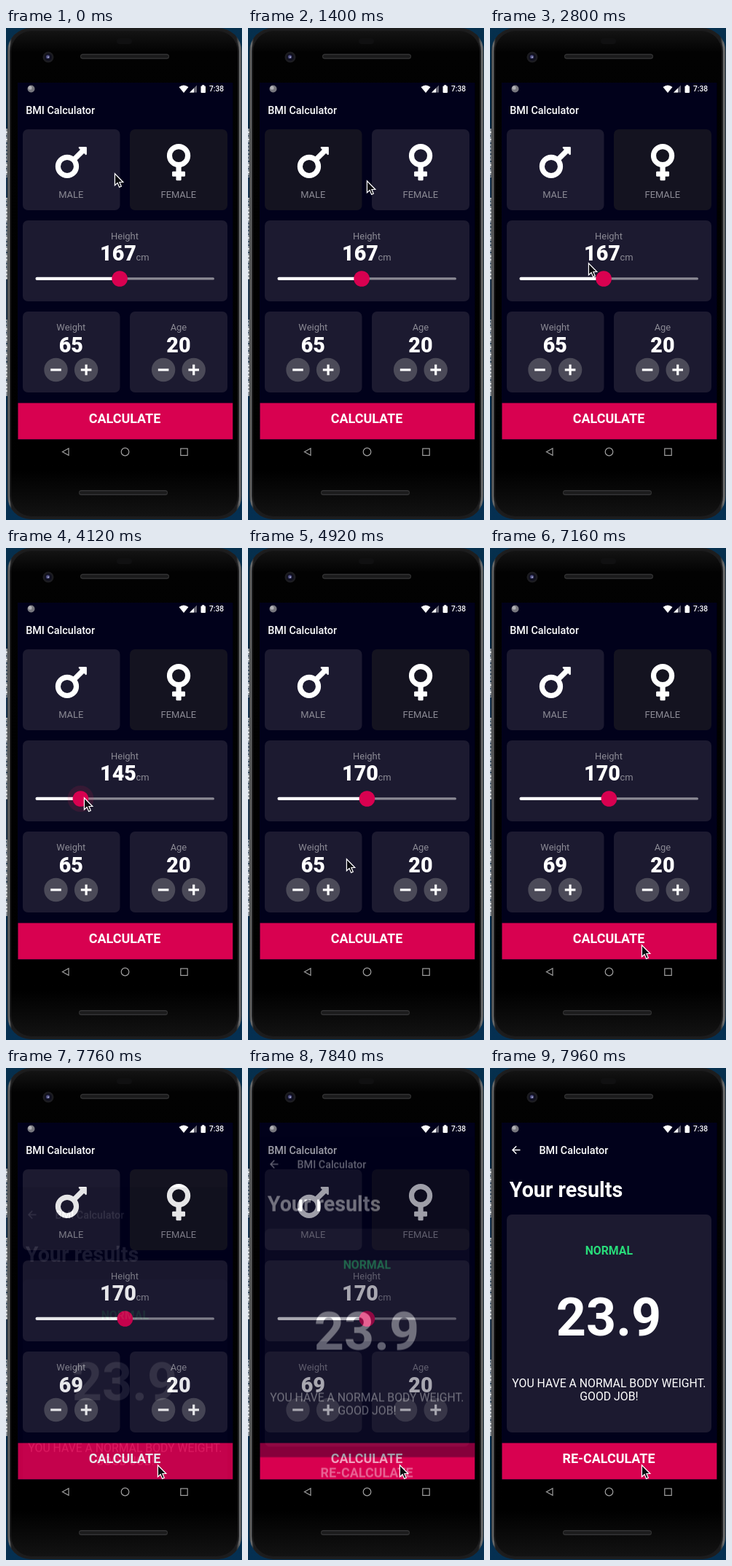
These frames come from a looping animation (324x675 px, 8 s). An HTML page with a canvas:

```html
<!DOCTYPE html>
<html lang="en">
<head>
<meta charset="utf-8">
<title>BMI Calculator</title>
<style>
html, body { margin: 0; width: 100%; height: 100%; overflow: hidden; background: #06304e; }
canvas { display: block; width: 324px; height: 675px; }
</style>
</head>
<body>
<canvas id="stage"></canvas>
<script>
const W = 324, H = 675, LOOP = 8000, STEP = 40;
const canvas = document.getElementById('stage');
const dpr = window.devicePixelRatio || 1;
canvas.width = W * dpr;
canvas.height = H * dpr;
const c = canvas.getContext('2d');

const NAVY = '#01011b', CARD = '#1c1a30', DIM = '#141320', PINK = '#d80150';
const GREY = '#8b8a94', WHITE = '#fff', ROUND = '#4b4a58';

// time, x, y of the pointer tip
const POINTER = [
  [560, 149, 199], [600, 190, 208], [640, 190, 208], [680, 231, 216],
  [1360, 231, 216], [1400, 163, 209], [1680, 163, 209], [1720, 86, 198],
  [2560, 86, 198], [2800, 135, 322], [3200, 158, 348], [3480, 158, 348],
  [3840, 109, 345], [3960, 109, 345], [4040, 105, 342], [4120, 107, 342],
  [4440, 167, 342], [4560, 167, 342], [4600, 168, 344], [4920, 135, 426],
  [5120, 125, 454], [5280, 125, 454], [5320, 120, 461], [5360, 120, 461],
  [5400, 115, 468], [6600, 115, 468], [6840, 206, 530], [7000, 206, 530],
  [7160, 208, 544]
];
const HEIGHT = [
  [3480, 167], [3840, 146], [3960, 146], [4040, 144], [4120, 145],
  [4440, 169], [4560, 169], [4600, 170]
];
const TAPS = [5760, 5960, 6160, 6360];
const PAGE_START = 7688, PAGE_TIME = 272;

const clamp = v => Math.max(0, Math.min(1, v));

function at(keys, t, col) {
  if (t <= keys[0][0]) return keys[0][col];
  for (let i = 1; i < keys.length; i++) {
    const a = keys[i - 1], b = keys[i];
    if (t <= b[0]) return a[col] + (b[col] - a[col]) * (t - a[0]) / (b[0] - a[0]);
  }
  return keys[keys.length - 1][col];
}

function bezier(x1, y1, x2, y2) {
  const f = (a, b, s) => 3 * a * s * (1 - s) ** 2 + 3 * b * s * s * (1 - s) + s ** 3;
  return x => {
    let lo = 0, hi = 1;
    for (let i = 0; i < 24; i++) {
      const m = (lo + hi) / 2;
      if (f(x1, x2, m) < x) lo = m; else hi = m;
    }
    return f(y1, y2, hi);
  };
}
const slowIn = bezier(.4, 0, .2, 1), easeIn = bezier(.42, 0, 1, 1);

function box(x, y, w, h, r, fill) {
  c.beginPath();
  c.roundRect(x, y, w, h, r);
  c.fillStyle = fill;
  c.fill();
}

function disc(x, y, r, fill) {
  c.beginPath();
  c.arc(x, y, r, 0, Math.PI * 2);
  c.fillStyle = fill;
  c.fill();
}

function poly(pts, fill) {
  c.beginPath();
  pts.forEach(([x, y]) => c.lineTo(x, y));
  c.closePath();
  if (fill) {
    c.fillStyle = fill;
    c.fill();
  }
}

function line(x1, y1, x2, y2, width, color) {
  c.beginPath();
  c.moveTo(x1, y1);
  c.lineTo(x2, y2);
  c.lineWidth = width;
  c.strokeStyle = color;
  c.stroke();
}

function text(s, x, y, size, weight, color = WHITE, align = 'center') {
  c.font = `${weight} ${size}px Roboto, sans-serif`;
  c.textAlign = align;
  c.fillStyle = color;
  c.fillText(s, x, y);
}

function gradient(x, y, stops) {
  const g = c.createLinearGradient(0, 0, x, y);
  stops.forEach(([p, color]) => g.addColorStop(p, color));
  return g;
}

function desktop() {
  box(0, 0, W, H, 0, gradient(0, H, [[0, '#06304e'], [.3, '#04233c'], [1, '#053052']]));
  box(0, 138, 4, 367, 0, '#8d949b');
  for (let y = 142; y < 500; y += 5) {
    const n = Math.abs(Math.sin(y * 12.9) * 43.7) % 1;
    box(0, y, 1 + n * 2, 2, 0, n > .5 ? '#d5d8da' : '#33485c');
  }
  box(0, 205, 3, 28, 0, '#183450');
  box(0, 345, 3, 55, 0, '#21384f');
}

function phone() {
  box(2, 0, 321.5, 674, 32, gradient(W, 0, [
    [.006, '#2c2d2e'], [.014, '#727475'], [.024, '#1d1d1e'],
    [.976, '#1d1d1e'], [.99, '#727475'], [1, '#3a3b3c']
  ]));
  box(5, 2, 315, 670, 30, '#1c1c1d');
  box(7, 4, 311, 666, 28, gradient(0, H, [
    [0, '#161616'], [.05, '#020202'], [.9, '#000'], [1, '#141414']
  ]));
  box(152, 14, 21, 8, 4, '#101011');
  for (const [x, y] of [[102, 35.5], [100, 634]]) {
    box(x, y, 122, 7, 3.5, '#333334');
    box(x + 1, y + 1.5, 120, 4, 2, '#1b1b1c');
  }
  disc(58, 40, 7.5, '#1c1c20');
  disc(58, 40, 5, '#10101f');
  disc(57.5, 39.5, 2.6, '#4a4a7c');
  disc(58, 40, 1.1, '#a9abc8');
  box(16, 75, 295.5, 525, 0, '#000');
}

function statusBar() {
  disc(34.5, 83.5, 5, '#77777e');
  disc(33, 82, 2.6, '#b0b0b5');
  c.beginPath();
  c.moveTo(244, 89);
  c.lineTo(237.5, 81);
  c.quadraticCurveTo(244, 76, 250.5, 81);
  c.closePath();
  c.fillStyle = WHITE;
  c.fill();
  poly([[252, 88.5], [262, 78.5], [262, 88.5]], '#686876');
  poly([[252, 88.5], [258, 82.5], [258, 88.5]], WHITE);
  box(267.5, 79.5, 6.5, 9.5, 1, WHITE);
  box(269.2, 78.2, 3, 2, 0, WHITE);
  text('7:38', 289, 87.3, 10.2, 500);
}

function navBar() {
  c.strokeStyle = '#a0a0a0';
  c.lineWidth = 1.2;
  poly([[77.5, 581.5], [86, 576.8], [86, 586.2]]);
  c.stroke();
  c.beginPath();
  c.arc(163.5, 581.5, 5.3, 0, Math.PI * 2);
  c.stroke();
  c.strokeRect(239.8, 577, 9.4, 9.4);
}

// gender signs are drawn on a 512 unit grid
function sign(x, y, draw) {
  c.save();
  c.translate(x, y);
  c.scale(.1122, .1122);
  c.strokeStyle = WHITE;
  c.lineWidth = 64;
  c.lineJoin = 'round';
  draw();
  c.restore();
}

function ring(x, y) {
  c.beginPath();
  c.arc(x, y, 112, 0, Math.PI * 2);
  c.stroke();
}

function male() {
  ring(144, 304);
  line(232, 216, 336, 112, 64, WHITE);
  poly([[294, 74], [374, 74], [374, 154]], WHITE);
  c.lineWidth = 20;
  c.stroke();
}

function female() {
  ring(144, 176);
  box(112, 300, 64, 180, 12, WHITE);
  box(64, 368, 160, 64, 12, WHITE);
}

function roundButton(x, plus) {
  disc(x, 469, 16.2, ROUND);
  box(x - 7.3, 467.4, 14.6, 3.2, 0, WHITE);
  if (plus) box(x - 1.6, 461.7, 3.2, 14.6, 0, WHITE);
}

function ripple(t) {
  for (const tap of TAPS) {
    const p = (t - tap) / 200;
    if (p < 0 || p >= 1) continue;
    c.save();
    c.globalAlpha = .22 * (1 - p);
    disc(110, 469, 8 + 8 * clamp(p * 2), WHITE);
    c.restore();
  }
}

function slider(t) {
  const value = Math.round(at(HEIGHT, t, 1));
  const x = 41.4 + (value - 120) * 2.44;
  text('Height', 163, 289.5, 12.93, 400, GREY);
  text(value, 129, 319, 28.7, 900, WHITE, 'left');
  text('cm', 178.6, 319, 12.93, 400, GREY, 'left');
  box(x, 342.2, 286 - x, 3.4, 1.7, GREY);
  box(40.5, 341.8, x - 40, 4.2, 2, WHITE);
  const halo = clamp((t - 3480) / 120) * clamp((4680 - t) / 120);
  if (halo > 0) disc(x, 344, 18 * halo, 'rgba(235,21,85,.12)');
  disc(x, 344, 10.8, PINK);
}

function counter(x, label, value) {
  text(label, x, 415, 12.93, 400, GREY);
  text(value, x, 445, 28.7, 900);
  roundButton(x - 20.8, false);
  roundButton(x + 20.8, true);
}

function bottomButton(label) {
  box(16.5, 514.5, 294.8, 49.7, 0, PINK);
  text(label, 163, 541.8, 17.95, 700);
}

function inputPage(t) {
  const isFemale = t >= 1160 && t < 2160;
  box(16, 75, 295.5, 490, 0, NAVY);
  text('BMI Calculator', 27.2, 117.5, 14.36, 500, WHITE, 'left');
  box(23, 139, 133.5, 111, 7, isFemale ? DIM : CARD);
  box(170, 139, 134, 111, 7, isFemale ? CARD : DIM);
  sign(67.8, 155.8, male);
  sign(220.9, 155.4, female);
  text('MALE', 89.2, 233.3, 12.93, 400, GREY);
  text('FEMALE', 236.8, 233.3, 12.93, 400, GREY);
  box(23, 264, 281, 111, 7, CARD);
  slider(t);
  box(23, 389, 133.5, 111, 7, CARD);
  box(170, 389, 134, 111, 7, CARD);
  counter(89.3, 'Weight', 65 + TAPS.filter(tap => t >= tap + 80).length);
  ripple(t);
  counter(236.9, 'Age', 20);
  bottomButton('CALCULATE');
}

function resultPage() {
  box(16, 75, 295.5, 490, 0, NAVY);
  line(31, 112.5, 41.5, 112.5, 1.5, WHITE);
  c.beginPath();
  c.moveTo(36.2, 107.2);
  c.lineTo(31, 112.5);
  c.lineTo(36.2, 117.8);
  c.stroke();
  text('BMI Calculator', 67.5, 117.5, 14.36, 500, WHITE, 'left');
  text('Your results', 26.8, 176.8, 28.7, 700, WHITE, 'left');
  box(23, 201, 281, 299, 7, CARD);
  text('NORMAL', 163.3, 255.8, 15.8, 700, '#28dc7a');
  text('23.9', 163, 367, 71.8, 700);
  text('YOU HAVE A NORMAL BODY WEIGHT.', 163.4, 437.5, 15.8, 400);
  text('GOOD JOB!', 163.4, 456, 15.8, 400);
  bottomButton('RE-CALCULATE');
}

// the new page fades in as one layer while it slides up
function transition(t) {
  const p = clamp((t - PAGE_START) / PAGE_TIME);
  if (p <= 0) return;
  c.save();
  c.beginPath();
  c.rect(16, 75, 295.5, 489.5);
  c.clip();
  c.globalAlpha = easeIn(p);
  c.drawImage(layer, 0, 122 * (1 - slowIn(p)), W, H);
  c.restore();
}

function pointer(t) {
  c.save();
  c.translate(at(POINTER, t, 1) + .4, at(POINTER, t, 2) + .8);
  poly([[0, 0], [0, 16], [3.7, 12.7], [6.2, 18.6], [8.9, 17.4], [6.5, 11.7], [11.4, 11.7]], '#0b0b10');
  c.lineWidth = 1.2;
  c.lineJoin = 'miter';
  c.strokeStyle = WHITE;
  c.stroke();
  c.restore();
}

const layer = document.createElement('canvas');
layer.width = canvas.width;
layer.height = canvas.height;

function renderLayer() {
  c.clearRect(0, 0, W, H);
  resultPage();
  const l = layer.getContext('2d');
  l.clearRect(0, 0, layer.width, layer.height);
  l.drawImage(canvas, 0, 0);
}

function frame() {
  const t = Math.floor(performance.now() % LOOP / STEP) * STEP;
  c.setTransform(dpr, 0, 0, dpr, 0, 0);
  if (t >= PAGE_START) renderLayer();
  desktop();
  phone();
  inputPage(t);
  transition(t);
  statusBar();
  navBar();
  pointer(t);
  requestAnimationFrame(frame);
}
frame();
</script>
</body>
</html>
```
